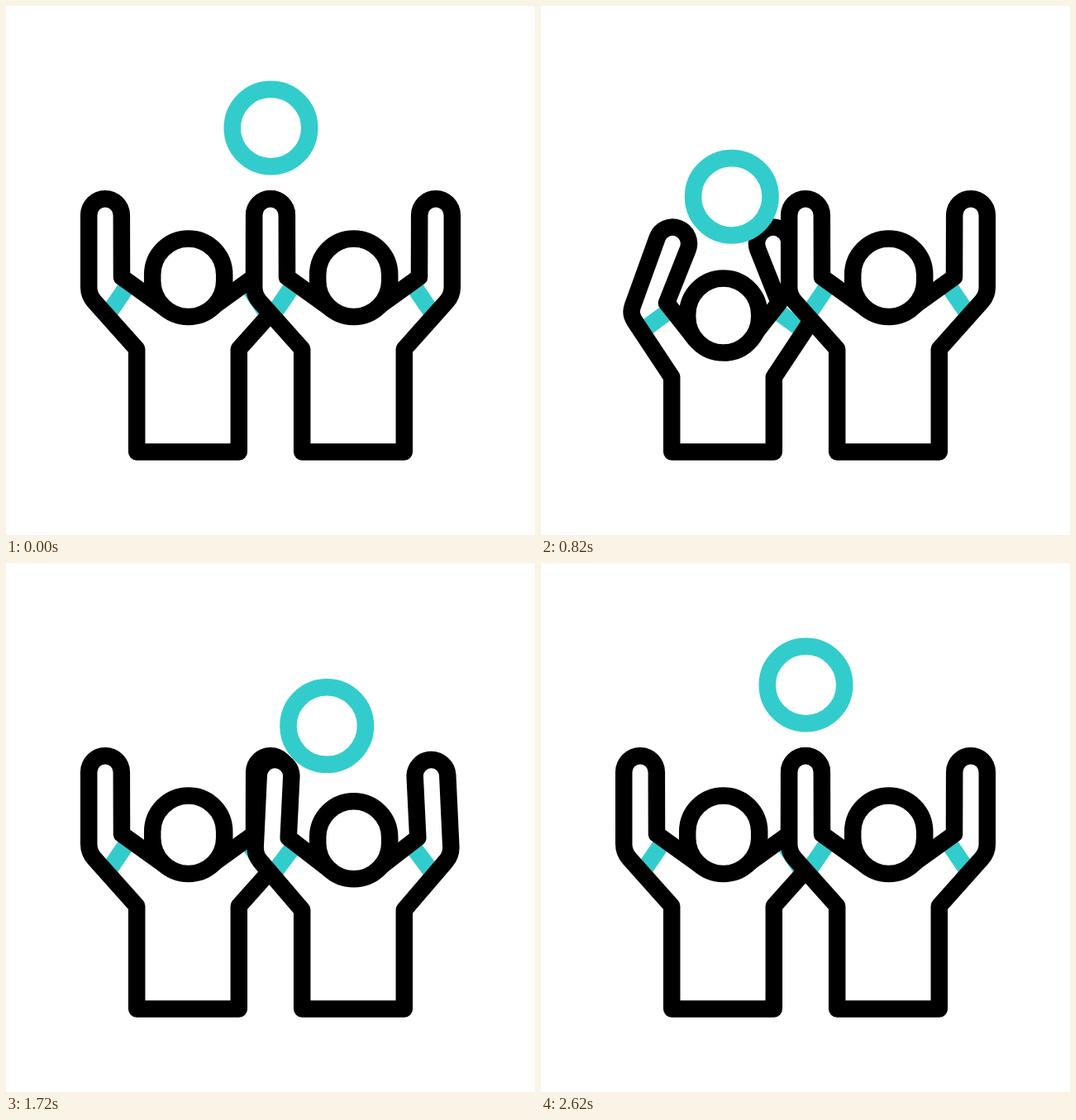
Recreate the animation shown at these times as an HTML page. Size 640x640 px, loop 3000 ms.

```html
<!DOCTYPE html>
<html lang="en">
<head>
<meta charset="utf-8">
<title>Ball toss</title>
<style>
  html, body { margin: 0; width: 100%; height: 100%; overflow: hidden; background: #fff; }
  svg { display: block; width: 100%; height: 100%; }
  path, rect, circle { fill: none; stroke-width: 20.5; stroke-linejoin: round; }
  .skin { fill: #fff; }
  .ink { stroke: #000; }
  .teal { stroke: #3cc; }
</style>
</head>
<body>
<svg viewBox="0 0 640 640">
  <g id="people"></g>
  <circle id="ball" class="teal" r="46.75"/>
</svg>
<script>
const LOOP = 3000, STEP = 20, START = 200, END = 2600, BEAT = 800;
const MIDDLE = 220, FLOOR = 539.5, WAIST_X = 158.2;
const HEAD_X = 220.7, HEAD_R = 43.5, HAND_R = 19.8;

// Joints of the left side; the right side mirrors them.
// band is where the sleeve meets the outer arm, from elbow to waist.
const REST = { waist: [WAIST_X, 415], elbow: [100.2, 350], hand: [120, 253],
               armpit: [140, 328], head: [281.5, 376], band: [0.38] };
const SQUAT = { waist: [WAIST_X, 457.5], elbow: [109.3, 378], hand: [169, 296],
                armpit: [155, 367], head: [341.5, 430.5], band: [0.25] };
const REACH = { waist: [WAIST_X, 405.5], elbow: [105.7, 338], hand: [124.5, 238.5],
                armpit: [147, 318], head: [273, 367], band: [0.31] };

const toss = at => [[at, REST], [at + 235, SQUAT], [at + 520, SQUAT], [at + BEAT, REST]];
const dip = at => [[at + 370, SQUAT], [at + 605, REST]];
const reach = at => [[at + 112, REACH]];

const LEFT_KEYS = [...toss(200), ...reach(1000), ...dip(1000), ...toss(1800)];
const RIGHT_KEYS = [[200, REST], ...dip(200), ...toss(1000), ...reach(1800), ...dip(1800)];

const mix = (p, q, k) => p.map((v, i) => v + (q[i] - v) * k);

// Symmetric ease in and out, cubic-bezier(a, 0, 1 - a, 1), solved by bisection.
function ease(x, a) {
  let lo = 0, hi = 1;
  for (let i = 0; i < 24; i++) {
    const s = (lo + hi) / 2, r = 1 - s;
    const at = 3 * r * r * s * a + 3 * r * s * s * (1 - a) + s * s * s;
    if (at < x) lo = s; else hi = s;
  }
  return lo * lo * (3 - 2 * lo);
}

function poseAt(keys, t) {
  let i = 0;
  while (i < keys.length - 2 && t >= keys[i + 1][0]) i++;
  const [t0, from] = keys[i], [t1, to] = keys[i + 1];
  const k = ease(Math.min(1, (t - t0) / (t1 - t0)), 0.6), pose = {};
  for (const part in from) pose[part] = mix(from[part], to[part], k);
  return pose;
}

// Point where a line from p touches the underside of the head.
function neckPoint([x, y], chinY) {
  const cy = chinY - HEAD_R, dx = x - HEAD_X, dy = y - cy;
  const angle = Math.atan2(dy, dx) - Math.acos(HEAD_R / Math.hypot(dx, dy));
  return [HEAD_X + HEAD_R * Math.cos(angle), cy + HEAD_R * Math.sin(angle)];
}

function sidePaths({ waist, elbow, hand, armpit, head, band }, mirrored) {
  const at = ([x, y]) => `${mirrored ? 2 * MIDDLE - x : x} ${y}`;
  const toward = (p, q, d) => mix(p, q, d / Math.hypot(q[0] - p[0], q[1] - p[1]));
  const [mx, my] = mix(elbow, armpit, 0.5);
  const length = Math.hypot(hand[0] - mx, hand[1] - my) / HAND_R;
  const nx = (my - hand[1]) / length, ny = (hand[0] - mx) / length;
  const outer = [hand[0] - nx, hand[1] - ny], inner = [hand[0] + nx, hand[1] + ny];
  const neck = neckPoint(armpit, head[1]);
  return {
    body: `M${at([MIDDLE + 6, FLOOR])}L${at([WAIST_X, FLOOR])}L${at(waist)}` +
      `L${at(toward(elbow, waist, 10))}Q${at(elbow)} ${at(toward(elbow, outer, 10))}` +
      `L${at(outer)}A${HAND_R} ${HAND_R} 0 0 ${mirrored ? 0 : 1} ${at(inner)}` +
      `L${at(armpit)}L${at(neck)}L${at([MIDDLE + 6, head[1]])}`,
    band: `M${at(mix(elbow, waist, band[0]))}L${at(mix(armpit, neck, 0.17))}`
  };
}

function add(parent, tag, attrs) {
  const el = document.createElementNS("http://www.w3.org/2000/svg", tag);
  for (const name in attrs) el.setAttribute(name, attrs[name]);
  return parent.appendChild(el);
}

function makePlayer(offset) {
  const g = add(document.getElementById("people"), "g", { transform: `translate(${offset} 0)` });
  const skin = add(g, "path", { class: "skin" });
  const bands = add(g, "path", { class: "teal" });
  const line = add(g, "path", { class: "ink" });
  const head = add(g, "rect", { class: "skin ink", x: HEAD_X - HEAD_R, width: 2 * HEAD_R, rx: HEAD_R });

  return pose => {
    const left = sidePaths(pose, false), right = sidePaths(pose, true);
    for (const path of [skin, line]) path.setAttribute("d", left.body + right.body);
    bands.setAttribute("d", left.band + right.band);
    const [top, chin] = pose.head;
    head.setAttribute("y", top);
    head.setAttribute("height", chin - top);
  };
}

const drawLeft = makePlayer(0), drawRight = makePlayer(200);
const ball = document.getElementById("ball");

// The ball swings from side to side once per beat: -1 is left, 1 is right.
function ballSide(t) {
  const beats = (t - START) / BEAT + 0.5, leg = Math.floor(beats);
  return (1 - 2 * ease(beats - leg, 0.85)) * (leg % 2 ? -1 : 1);
}

function draw(time) {
  const t = Math.min(END, Math.max(START, Math.floor(time / STEP) * STEP));
  drawLeft(poseAt(LEFT_KEYS, t));
  drawRight(poseAt(RIGHT_KEYS, t));
  const side = ballSide(t), s = Math.abs(side);
  ball.setAttribute("cx", 320.5 + 100.5 * side);
  ball.setAttribute("cy", 147.5 + 124 * s * s - 22 * s * s * s);
}

const begin = performance.now();
function tick() {
  draw((performance.now() - begin) % LOOP);
  requestAnimationFrame(tick);
}
tick();
</script>
</body>
</html>
```
